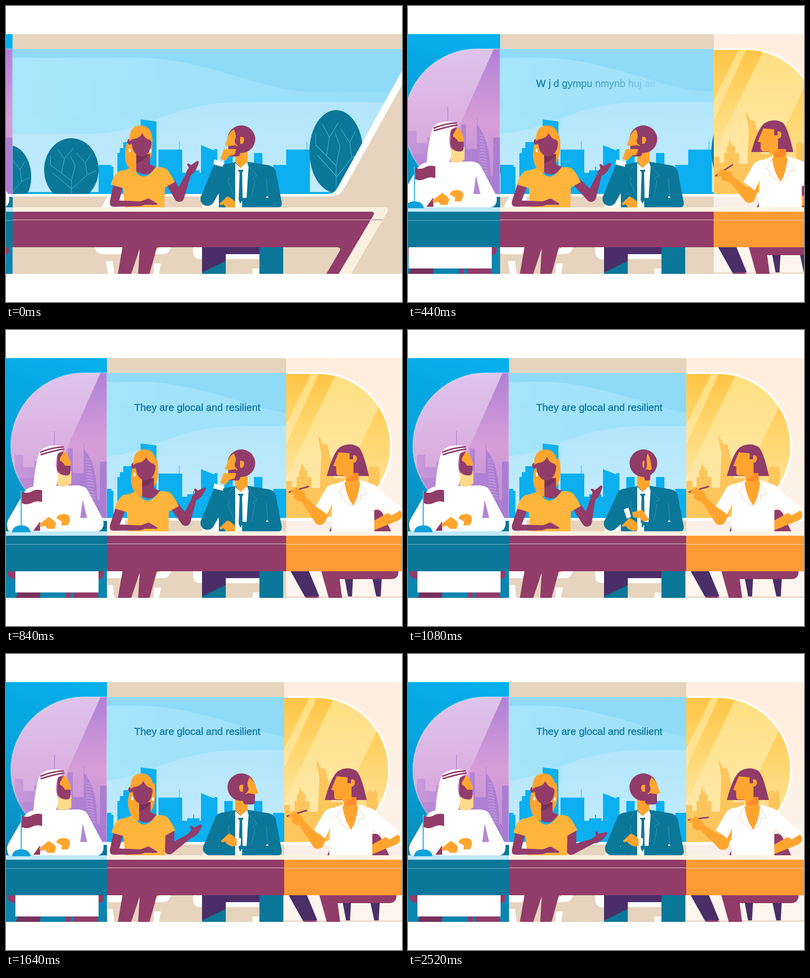
An HTML page with a canvas that plays this animation: 800 px wide and 600 px high, repeating every 2560 ms.

```html
<!DOCTYPE html>
<html lang="en">
<head>
<meta charset="utf-8">
<title>Round table</title>
<style>
html, body { margin: 0; width: 100%; height: 100%; overflow: hidden; background: #fff; }
canvas { display: block; }
</style>
</head>
<body>
<canvas id="stage" width="800" height="600"></canvas>
<script>
const ctx = document.getElementById('stage').getContext('2d');
const LOOP = 2560;
const PLUM = '#923c69', DARK_PLUM = '#78305b', INDIGO = '#4b2e68', TEAL = '#0b7799',
      BLUE = '#0caff0', SAND = '#e6d4be', CREAM = '#fbf0e0', AMBER = '#ffb43c',
      ORANGE = '#ffa52f', WHITE = '#fff';

// ---- helpers ----
const clamp = v => Math.max(0, Math.min(1, v));
const smooth = v => (v = clamp(v), v * v * (3 - 2 * v));
const quartOut = v => 1 - (1 - clamp(v)) ** 4;
const mix = (a, b, k) => a + (b - a) * k;

function pose(keys, t) {
  let i = 0;
  while (i < keys.length - 2 && t >= keys[i + 1][0]) i++;
  const [a, b] = [keys[i], keys[i + 1]];
  const k = smooth((t - a[0]) / (b[0] - a[0]));
  return a.slice(1).map((v, n) => mix(v, b[n + 1], k));
}
function shape(color, d) {
  ctx.fillStyle = color;
  ctx.fill(new Path2D(d));
}
function line(color, width, d) {
  ctx.strokeStyle = color;
  ctx.lineWidth = width;
  ctx.stroke(new Path2D(d));
}
function rect(color, x, y, w, h) {
  ctx.fillStyle = color;
  ctx.fillRect(x, y, w, h);
}
function oval(color, x, y, rx, ry = rx) {
  ctx.fillStyle = color;
  ctx.beginPath();
  ctx.ellipse(x, y, rx, ry, 0, 0, 7);
  ctx.fill();
}
// Tapered limb with round ends
function limb(color, x1, y1, r1, x2, y2, r2) {
  const a = Math.atan2(y2 - y1, x2 - x1);
  ctx.fillStyle = color;
  ctx.beginPath();
  ctx.arc(x1, y1, r1, a + Math.PI / 2, a - Math.PI / 2);
  ctx.arc(x2, y2, r2, a - Math.PI / 2, a + Math.PI / 2);
  ctx.fill();
}
function gradient(x1, y1, x2, y2, ...colors) {
  const g = ctx.createLinearGradient(x1, y1, x2, y2);
  colors.forEach((c, i) => g.addColorStop(i / (colors.length - 1), c));
  return g;
}
function group(draw, x = 0, y = 0, degrees = 0, sx = 1) {
  ctx.save();
  ctx.translate(x, y);
  ctx.rotate(degrees * Math.PI / 180);
  ctx.scale(sx, 1);
  draw();
  ctx.restore();
}
function clipped(d, draw) {
  ctx.save();
  ctx.clip(new Path2D(d));
  draw();
  ctx.restore();
}

// ---- centre panel ----
function tree(x, y, rx, ry) {
  oval(TEAL, x, y, rx, ry);
  group(() => {
    ctx.scale(rx / 55, ry / 64);
    line('#48b6dc', 1, 'M0,64V22L-42,-10V-28M0,38L-38,6M-20,7L-14,-22L-28,-42M-14,-22L4,-44' +
      'M0,40L32,10L28,-14L40,-32M28,-14L10,-34M32,10L50,2M0,22L8,-8L-2,-28M28,64L48,28');
  }, x, y);
}
function city() {
  rect(BLUE, 0, 377, 665, 4);
  shape(BLUE, 'M187,381V322H213V326H217V381ZM225,381V298H230V288H237V276H272V230L304,234V381Z' +
    'M308,381V291H349.5V275H350.5V291H356V338H366V333H378V326H380V333H391V338H394V282L421,293V381Z' +
    'M421,381V290H427V381ZM441,381V298H458V381ZM501,381V298H518V330H540V322H566V291H607.5V275H608.5V291H614V381Z');
}
function view() {
  rect(gradient(0, 0, 800, 0, '#aae7fa', '#96def8'), 0, 87, 800, 294);
  shape('#8edaf7', 'M0,87H800V174H620C520,174 400,105 270,105H0Z');
  shape(gradient(0, 200, 0, 380, '#b3e6fb', '#c3ecfc'), 'M0,259H170C285,259 330,196 470,195H800V381H0Z');
  city();
  tree(132, 332, 55, 64);
  tree(5, 346, 46, 64);
  tree(667, 295, 54, 84);
}
function woman(t) {
  const [body, head, hair, ex, ey, wx, wy, turn] = pose([
    [0, 0, -1, 0, 350, 387, 370, 338, -42],
    [440, 8, 8, 12, 370, 387, 388, 339, -32],
    [840, 8, 7, 12, 363, 387, 381, 340, -32],
    [1320, 8, 2, 13, 360, 390, 368, 340, -58],
    [1640, 1, 1, 6, 330, 396, 374, 367, -35],
    [2000, 1, 1, 6, 330, 397, 377, 378, -22],
    [LOOP, 1, 1, 6, 330, 397, 377, 378, -22]], t);
  shape(WHITE, 'M193,408L207,382H240V408Z');
  group(() => shape(ORANGE, 'M280,262H294Q300,304 284,322H276Z'), hair);
  limb(PLUM, 330 + body, 354, 9, ex, ey, 10);
  limb(PLUM, ex, ey, 10, wx, wy, 4.5);
  group(() => shape(PLUM, 'M-4,-5L6,-8L8,-15Q12,-18 13,-9L28,-7Q32,-4 26,-1L16,4Q6,8 -4,5Z'), wx, wy, turn);
  limb(PLUM, 226 + body / 2, 366, 10, 219, 397, 9);
  group(() => {
    shape(PLUM, 'M263,300H291V321L303,326Q284,356 255,328L263,325Z');
    shape(AMBER, 'M212,362Q217,341 230,334Q242,333 256,326Q276,365 302,327Q318,325 326,332Q336,345 341,357' +
      'L321,368L320,408H240L236,369Z');
  }, body);
  group(() => {
    shape(DARK_PLUM, 'M263,302H287Q280,313 263,319Z');
    shape(ORANGE, 'M256,260C236,278 232,330 263,338V290Z');
  }, hair);
  group(() => {
    oval(PLUM, 251, 275, 5, 6);
    oval(PLUM, 275, 277, 20, 28);
    shape(ORANGE, 'M250,274Q250,242 273,242Q298,243 297,277L291,271Q282,270 276,257Q273,268 256,270Z');
  }, head);
  oval(WHITE, 250 + hair * .8, 293, 2, 4);
  if (hair < 8) oval(WHITE, 292 + hair * .8, 294, 2, 4);
  shape(PLUM, 'M210,396Q211,388 222,394L272,396L288,390L305,400Q308,403 302,403H280L272,406L218,407Q208,407 210,396Z');
}
function man(t) {
  const down = smooth((t - 880) / 380);
  const flip = 1 - 2 * smooth((t - 960) / 180);
  const [lift, shift] = pose([[0, 0, 0], [880, 0, 0], [1320, -11, 1], [1640, -22, 3], [LOOP, -22, 3]], t);
  shape(WHITE, 'M396,408L402,398L432,384V408Z');
  shape(TEAL, 'M422,332Q428,322 440,321L465,316H490L525,322Q541,323 545,335L557,398Q558,408 550,408H430V345Z');
  shape(WHITE, 'M463,318L474,328L487,316L490,325L486,389H477V408H463Z');
  shape(ORANGE, 'M463,294H488V316L474,328L463,316Z');
  shape(TEAL, 'M468,332H480L477,338L478,393L473,401L470,393L472,338Z');
  line('#3896b3', 1, 'M457,320L442,344L452,349L448,354L462,388M488,322L508,344L498,349L503,354L496,388M526,350L529,387');
  shape(WHITE, 'M527,385L531,389H525Z');

  oval(PLUM, 475.5, 270, 28);
  group(() => {
    shape(PLUM, 'M-27,14V30Q-27,35 -20,35H-7Q-1,33 -2,14Z');
    shape(ORANGE, 'M-16,-20Q-27,-12 -29,0L-34,12L-27,14V21L-12,19L-8,12Q-14,10 -14,2Q-9,-8 -16,-20Z');
    shape(PLUM, 'M-27,14L-12,12L-5,20V34H-20Q-27,34 -27,28Z');
    shape(ORANGE, 'M-3,-5Q6,-6 5,2Q4,11 -3,9Z');
  }, 476, 270, 0, flip);

  const ex = mix(407, 412, down), ey = mix(391, 394, down);
  const wx = mix(429, 444, down), wy = mix(326, 416, down);
  limb(TEAL, 437, 337, 15, ex, ey, 14);
  limb(TEAL, ex, ey, 14, wx, wy, 10);
  group(() => {
    shape(ORANGE, 'M4,-16L11,-36H36L33,-25L22,-22L14,-12Z');
    shape(WHITE, 'M-8,-15L11,-9L9,0L-10,-5Z');
  }, wx, wy, down * 104);
  group(() => {
    shape(WHITE, 'M463,393L472,396L471,410L462,413Z');
    shape(ORANGE, 'M431,401L447,386Q456,389 463,397V411L453,412L443,407L440,402L434,404Z');
  }, shift, lift);
}
function centre(t) {
  rect(SAND, 0, 57, 800, 486);
  clipped('M0,87H800V135L676,364Q667,381 650,381H0Z', view);
  shape(WHITE, 'M800,131V160L682,372Q673,386 655,386H0V381H648Q663,381 670,368Z');
  // chairs and legs below the table
  shape(WHITE, 'M179,485H333V489Q330,503 316,503H196Q182,503 179,489ZM202,517H216L219,543H206Z' +
    'M299,522H313L309,543H298ZM378,485H512V513H392Q378,512 378,498Z');
  shape(SAND, 'M444,513H512V532H498V543H444Z');
  shape(WHITE, 'M498,532H512V543H498Z');
  shape(ORANGE, 'M300,485H314Q310,492 302,492Z');
  shape(PLUM, 'M236,485H306L290,543H267L270,492L253,543H226Z');
  shape(INDIGO, 'M396,485H512V503H444V543H396Z');
  shape(TEAL, 'M512,485H560V543H512ZM396,540L444,517V543H396Z');
  woman(t);
  man(t);
  shape(CREAM, 'M0,408H765Q775,408 770,418L697,543H660L740,417H0Z');
  shape(PLUM, 'M0,417H738Q746,417 742,425L672,543H647L674,497Q678,489 668,489H0Z');
  line('#e7cdd3', 1.2, 'M0,433.5H743');
  line(PLUM, 1, 'M740,433.5H760');
}

// ---- left panel ----
function skyline() {
  shape(gradient(10, 0, 204, 0, 'rgba(166,122,210,.35)', 'rgba(166,122,210,.9)'),
    'M0,383V310H18V253H35V278H57V266H70V290H93V240H97V205H99V240H102V300H125V240H135V290H157V228H158V242' +
    'C176,262 185,300 184,345H190V267H204V383Z');
  for (let y = 262; y < 342; y += 6)
    line('#d3a4dc', 1.2, `M162,${y}Q${166 + (y - 262) / 8},${y - 2} ${170 + (y - 262) / 7},${y + 2}`);
}
function left() {
  rect(gradient(204, 57, 60, 480, '#06b0ee', '#07a0d8', '#0b84ae'), 0, 57, 204, 486);
  const glass = 'M204,87H158A148,148 0 0 0 158,383H204Z';
  clipped(glass, () => {
    rect(gradient(0, 87, 0, 383, '#b080d6', '#d79fd8', '#b98bd6'), 0, 87, 204, 296);
    shape(gradient(0, 87, 0, 300, '#dfc4ec', '#d8a8dc'), 'M0,87H191L96,300H0Z');
    skyline();
  });
  line('rgba(255,255,255,.25)', 3, glass);
  rect('#e9f5fc', 150, 381, 54, 6);
  rect(TEAL, 0, 387, 204, 21);
  // figure
  shape(WHITE, 'M3,400Q0,392 6,382L36,330Q44,317 60,317L146,315Q161,316 166,327L195,382Q200,394 194,403Q190,408 184,408H8Q3,407 3,400Z');
  shape('#b487d4', 'M155,344L164,381H150Z');
  shape('#ffd98a', 'M106,286H132V311Q118,322 104,314Z');
  shape(PLUM, 'M104,250L117,246L119,270H130V288Q130,295 122,295Q105,294 103,280Z');
  shape(ORANGE, 'M117,246Q126,252 131,270L130,275H119Q116,268 109,265Q108,260 112,255Z');
  shape(WHITE, 'M55,322Q58,276 68,246Q79,234 98,234Q113,233 118,240L105,251Q96,272 106,295Q105,310 100,318Z');
  line(PLUM, 3, 'M69,248Q92,238 117,237M70,253Q94,245 118,241');
  shape(PLUM, 'M55,407L69,388V407Z');
  shape(ORANGE, 'M67,394L86,379Q98,385 101,392L98,403H84L79,397L70,399ZM102,382Q104,373 118,373Q131,374 129,387L125,396H112L113,388Z');
  // table
  rect('#bfe7f7', 0, 408, 204, 9);
  rect(TEAL, 0, 417, 204, 72);
  line('#6fb7cd', 1.2, 'M0,434.5H204');
  shape(PLUM, 'M2,489H197V498Q194,505 187,505H19Q2,503 2,489Z');
  rect(WHITE, 19, 489, 168, 43);
  shape(DARK_PLUM, 'M24,532H70L68,543H20Z');
  shape(PLUM, 'M121,532H131V543H121ZM137,532H185L187,543H137Z');
  // flag
  rect('#3db9ec', 29.5, 325, 2.5, 74);
  shape('#0fa0da', 'M12,410Q14,396 31,396Q47,396 50,410Z');
  shape(PLUM, 'M32,328Q44,333 54,326Q63,322 73,325V349Q63,345 53,350Q43,356 32,351Z');
}

// ---- right panel ----
function goldView() {
  rect(gradient(0, 87, 0, 383, '#ffdf80', '#ffe59c', '#ffeab0'), 562, 87, 230, 296);
  shape(gradient(0, 87, 0, 300, '#ffc445', 'rgba(255,214,105,.2)'),
    'M562,88H613L562,192ZM628,88H663L562,300V232Z');
  shape(gradient(0, 150, 0, 383, '#ffcd58', 'rgba(255,222,130,.3)'), 'M752,150L790,200V383H640Z');
  shape('#fcc65d', 'M562,383V306H574V318H583V298H588V284H592V278L594,267L596,278H600V284H605V298H613V320H630' +
    'L633,250L626,212L637,232H645L653,262L658,300H680V312H728V280L736,275L742,281L746,275L751,282V312H773V383Z');
}
function writer(t) {
  const [head, arm, pen, dx, dy] = pose([
    [0, -6, -6, -11, 4, 4], [440, -6, -6, -11, 4, 4], [840, 0, 0, 0, 0, 0],
    [2000, 0, 0, 0, 0, 0], [2520, 0, -12, 21, 6, 2], [LOOP, 0, -12, 21, 6, 2]], t);
  shape(PLUM, 'M649,408L658,388V408ZM738,366Q752,360 758,374L774,408H736Z');
  group(() => shape(PLUM, 'M644,296Q656,250 670,238Q690,226 708,237Q718,246 729,296Z'), head);
  shape('#ff8c2b', 'M681,290H708V312H684Z');
  group(() => {
    limb(ORANGE, 0, 0, 12, -35, -43, 6);
    limb(ORANGE, 0, 0, 12, 10, -18, 11);
    group(() => {
      line(PLUM, 3, 'M-24,-7L17,-19');
      shape(ORANGE, 'M-20,-8L-9,-17L-4,-14L10,-4L8,8L-3,12L-14,4L-12,-4L-19,-3Z');
    }, -39, -47, pen);
  }, 630 + dx, 383 + dy, arm);
  limb(ORANGE, 784, 375, 12, 728, 402, 8);
  shape(ORANGE, 'M691,405Q702,396 716,397L736,396V408H692Z');
  shape(WHITE, 'M622,357L641,324Q646,313 664,311L683,304L698,356L710,304L732,311Q745,314 752,325L797,363L775,376L740,354V408H653L655,352L645,374Z');
  shape(ORANGE, 'M683,304H708L711,310Q708,340 697,356Q684,338 680,311Z');
  shape('#ff8c2b', 'M682,295H707V303Q694,311 684,305Z');
  line('#e8d3b0', 1, 'M680,309L668,330L676,334L674,342L697,358L713,344L712,335L725,333L711,309');
  group(() => shape(ORANGE,
    'M668,248L690,250V262H697V254Q705,253 705,261Q704,268 698,269V294L684,302L679,295H668Q663,294 663,288V277L657,275Z'), head);
}
function right(t) {
  rect(gradient(700, 57, 640, 480, '#ffeddd', '#fdf5ee'), 562, 57, 480, 486);
  const glass = 'M562,88H626A147.5,147.5 0 0 1 626,383H562Z';
  clipped(glass, goldView);
  line(WHITE, 4, 'M562,87H626A148,148 0 0 1 626,383');
  rect(WHITE, 562, 381, 480, 6);
  rect('#f9efe8', 562, 387, 480, 21);
  writer(t);
  rect('#fff4e4', 562, 408, 480, 9);
  rect('#ff9b35', 562, 417, 480, 72);
  line('#ffdcae', 1.2, 'M562,434.5H1000');
  rect('#e9d9c8', 562, 540, 480, 3);
  shape(INDIGO, 'M571,489H608L629,540L600,541ZM680,503H697L695,540H687ZM736,503H755L753,540H744Z');
  shape(PLUM, 'M633,489H789Q789,505 774,505H670L675,543H648ZM600,543Q604,538 624,540L630,543Z');
}

// ---- title ----
const TITLE = 'They are glocal and resilient', NOISE = 'W j d gympu nmynb huj ae';
function title(t) {
  ctx.font = '20.4px "Liberation Sans", Arial, sans-serif';
  ctx.fillStyle = ctx.strokeStyle = '#117ba2';
  ctx.lineWidth = .5;
  const step = Math.floor((t - 440) / 40);
  const scramble = c => /[a-z]/.test(c)
    ? String.fromCharCode(97 + ((c.charCodeAt(0) - 97 + step * 5) % 26 + 26) % 26) : c;
  const done = t > 770;
  let x = 259;
  (done ? [TITLE] : [...TITLE]).forEach((c, i) => {
    if (!done && t < 500 + 9 * i) c = scramble(NOISE[i] || ' ');
    ctx.globalAlpha = done ? 1 : clamp((t - 240 - 8 * i) / 200);
    ctx.fillText(c, x, 163.5);
    ctx.strokeText(c, x, 163.5);
    x += ctx.measureText(c).width;
  });
  ctx.globalAlpha = 1;
}

function draw(now) {
  const t = now % LOOP;
  const leftEdge = 204 * quartOut((t + 16) / 1000);
  const rightEdge = 800 - 238 * quartOut((t - 77) / 1194);
  rect(WHITE, 0, 0, 800, 600);
  clipped('M0,57H800V543H0Z', () => {
    centre(t);
    title(t);
    clipped(`M0,57H${leftEdge}V543H0Z`, () => group(left, leftEdge - 204));
    clipped(`M${rightEdge},57H800V543H${rightEdge}Z`, () => group(() => right(t), rightEdge - 562));
  });
  requestAnimationFrame(() => draw(performance.now()));
}
draw(0);
</script>
</body>
</html>
```
